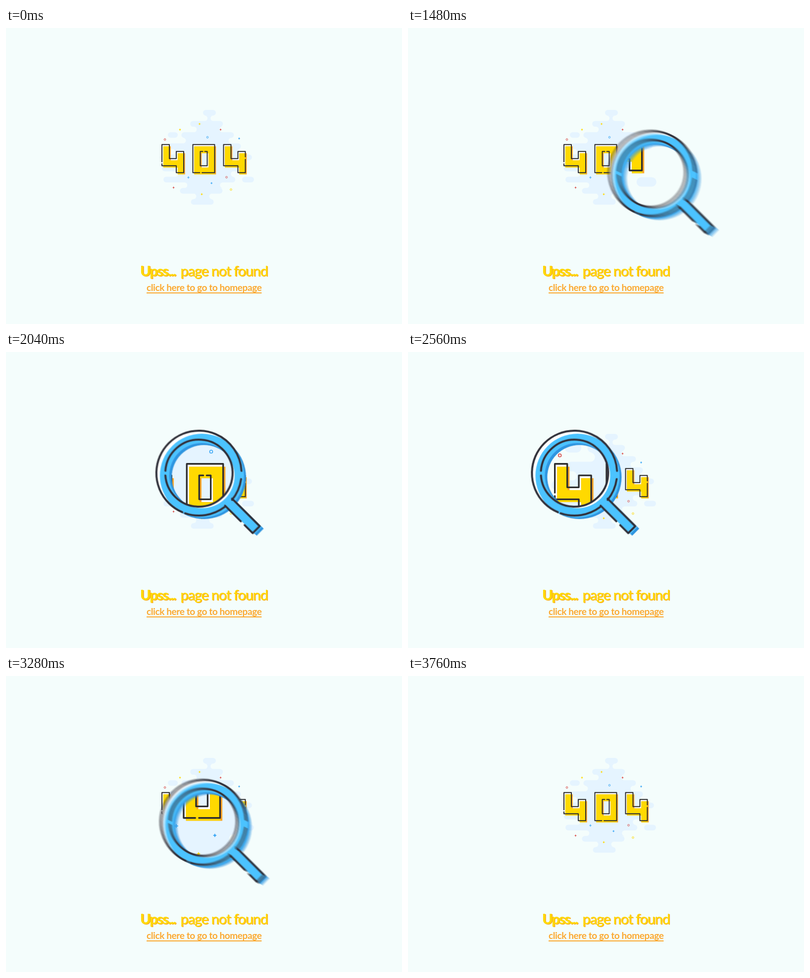
Recreate the animation shown at these times as an HTML page with a canvas. Size 800 px wide and 600 px high, loop 4.8 s.

```html
<!DOCTYPE html>
<html lang="en">
<head>
<meta charset="utf-8">
<title>404</title>
<style>
html, body { margin: 0; width: 100%; height: 100%; overflow: hidden; background: #f4fdfc; }
.stage { position: absolute; left: 0; top: 0; width: 800px; height: 600px; overflow: hidden; }
canvas { position: absolute; left: 0; top: 0; }
span { position: absolute; white-space: nowrap; font-family: Lato, sans-serif; line-height: 1; }
.title { top: 476.5px; font-size: 29px; color: #ffd900; text-shadow: 1.4px 1.2px 0 #f8a92b; }
.upss { left: 271px; font-weight: 800; letter-spacing: -1.8px; }
.rest { right: 271.5px; font-weight: 500; letter-spacing: -1.25px; }
.link { left: 284px; top: 516px; font-size: 19px; font-weight: 700; letter-spacing: -.4px;
  color: #fba931; text-decoration: underline 1.5px; text-underline-offset: 2.5px; }
</style>
</head>
<body>
<div class="stage">
  <canvas id="view" width="800" height="600"></canvas>
  <span class="title upss">Upss...</span>
  <span class="title rest">page not found</span>
  <span class="link">click here to go to homepage</span>
</div>
<script>
const LOOP = 4800, STEP = 40, ENTER = 1040, LEAVE = 3760;
const ZOOM = 1.67, SHUTTER = 20, SAMPLES = 15, ORIGIN = 110;
const BG = '#f4fdfc', CLOUD = '#e5f4ff', INK = '#2d2d2f', YELLOW = '#ffd900', ORANGE = '#f9a62b';
const BLUE = '#4ab8f8', DEEP = '#2d8fd8', RED = '#d9534f', SKY = '#3fa9f5';
const TAU = 2 * Math.PI;

const sparks = [
  ['star', 391, 194.5, YELLOW], ['star', 351.5, 206, YELLOW], ['star', 433.5, 206, RED],
  ['ring', 407, 221.5, SKY], ['star', 471, 224, SKY], ['ring', 321, 226, RED],
  ['plus', 368.5, 303, SKY], ['star', 415.2, 314.5, SKY], ['ring', 445.5, 302.5, RED],
  ['star', 338.5, 323.5, RED], ['ring', 454.5, 327.5, YELLOW], ['star', 395.5, 337, YELLOW]
];

const W = 44, H = 57, STEM = 15, BAR = 14;
const rect = (x, y, w, h) => [[x, y], [x + w, y], [x + w, y + h], [x, y + h]];
const four = [
  [0, 0], [STEM, 0], [STEM, H / 2], [W - STEM, H / 2], [W - STEM, BAR],
  [W, BAR], [W, H], [W - STEM, H], [W - STEM, H - BAR], [0, H - BAR]
];
const digits = [
  { x: 315, fill: [four], lines: [[[0, 35], ...four, [0, 39]]] },
  {
    x: 377.5, fill: [rect(0, 0, W, H), rect(STEM, BAR, W - 2 * STEM, H - 2 * BAR)],
    lines: [
      [[14, H], [0, H], [0, 0], [W, 0], [W, H], [18.5, H]],
      [[20, BAR], [STEM, BAR], [STEM, H - BAR], [W - STEM, H - BAR], [W - STEM, BAR], [24, BAR]]
    ]
  },
  { x: 439.5, fill: [four], lines: [[[W, 30], ...four.slice(6), ...four.slice(0, 6), [W, 25]]] }
];

const makeCanvas = (w, h) =>
  Object.assign(document.createElement('canvas'), { width: w, height: h }).getContext('2d');
const view = document.getElementById('view').getContext('2d');
const lens = makeCanvas(2 * ORIGIN + 40, 2 * ORIGIN + 40), blur = makeCanvas(800, 600);

const part = (t, from, to) => Math.min(1, Math.max(0, (t - from) / (to - from)));
const smooth = u => u * u * (3 - 2 * u);

function line(c, pts) {
  pts.forEach(([x, y], i) => i ? c.lineTo(x, y) : c.moveTo(x, y));
}

function strokeLine(c, pts) {
  c.beginPath();
  line(c, pts);
  c.stroke();
}

function shape(polys, dx, dy) {
  const p = new Path2D();
  for (const pts of polys) {
    line(p, pts.map(([x, y]) => [x + dx, y + dy]));
    p.closePath();
  }
  return p;
}

function fill(c, path, color) {
  c.fillStyle = color;
  c.fill(path, 'evenodd');
}

function pen(c, width) {
  c.strokeStyle = INK;
  c.lineWidth = width;
  c.lineCap = c.lineJoin = 'round';
}

// round ends bulge out on pills and cut in on necks
function cloudRow(c, x0, x1, y, h, isNeck) {
  const r = h / 2, d = isNeck ? -r : r;
  c.beginPath();
  c.arc(x1 - d, y + r, r, -TAU / 4, TAU / 4, isNeck);
  c.arc(x0 + d, y + r, r, TAU / 4, -TAU / 4, isNeck);
  c.fill();
}

function drawCloud(c) {
  const h = 11.3, top = 166;
  c.fillStyle = CLOUD;
  for (let i = 0; i < 17; i++) {
    const neck = i % 2 === 1;
    const half = 98 - 10 * Math.abs(i - 8.5) - (neck ? 20 : 0);
    const mid = 411 - .9 * i - (i % 4 === 2 ? 4 : 0);
    cloudRow(c, mid - half, mid + half, top + i * h, h + .2, neck);
  }
  cloudRow(c, 327, 347, top + 4 * h, h);
  cloudRow(c, 318, 350, top + 12 * h, h);
  cloudRow(c, 477, 501, top + 12 * h, h);
}

function drawSpark(c, [kind, x, y, color]) {
  c.fillStyle = c.strokeStyle = color;
  c.lineWidth = 1;
  c.beginPath();
  if (kind === 'ring') {
    c.arc(x, y, 1.8, 0, TAU);
    c.stroke();
  } else if (kind === 'plus') {
    c.rect(x - 2.3, y - .6, 4.6, 1.2);
    c.rect(x - .6, y - 2.3, 1.2, 4.6);
    c.fill();
  } else {
    for (let i = 0; i < 8; i++) {
      const a = i * TAU / 8, d = i % 2 ? 1.2 : 2.4;
      c.lineTo(x + d * Math.cos(a), y + d * Math.sin(a));
    }
    c.fill();
  }
}

function drawDigit(c, d) {
  const face = shape(d.fill, 2.8, 3.4);
  c.save();
  c.translate(d.x, 236.3);
  fill(c, shape(d.fill, 0, 0), '#fff');
  fill(c, face, ORANGE);
  c.save();
  c.clip(shape(d.fill, .3, 3.4), 'evenodd');
  fill(c, face, YELLOW);
  c.restore();
  pen(c, 2);
  d.lines.forEach(l => strokeLine(c, l));
  c.restore();
}

function drawScene(c) {
  c.fillStyle = BG;
  c.fillRect(0, 0, 800, 600);
  drawCloud(c);
  sparks.forEach(s => drawSpark(c, s));
  digits.forEach(d => drawDigit(c, d));
}

function annulus(x, y, outer, inner) {
  const p = new Path2D();
  p.arc(x, y, outer, 0, TAU);
  p.closePath();
  p.moveTo(x + inner, y);
  p.arc(x, y, inner, 0, TAU);
  return p;
}

function arcLine(c, radius, from, to) {
  c.beginPath();
  c.arc(-6, -5, radius, from * TAU / 360, to * TAU / 360);
  c.stroke();
}

function buildLens(c) {
  // along and across the handle, which points down right
  const grip = (a, b) => [(a - b) * Math.SQRT1_2, (a + b) * Math.SQRT1_2];
  const near = 76, far = 155, half = 10;
  const handle = [grip(near, half), grip(far, half), grip(far, -half), grip(near, -half)];
  c.translate(ORIGIN, ORIGIN);
  fill(c, annulus(-6, -5, 86, 68), '#fff');
  fill(c, shape([handle], 8, 5), DEEP);
  fill(c, annulus(4, 3, 85, 65), DEEP);
  fill(c, shape([handle], 4, 2), BLUE);
  fill(c, annulus(0, 0, 85, 66), BLUE);
  pen(c, 4);
  arcLine(c, 86, 113, 357);
  arcLine(c, 86, 8, 39);
  arcLine(c, 86, 53, 109);
  arcLine(c, 68, 184, 536);
  strokeLine(c, [handle[0], grip(121, half)]);
  strokeLine(c, [grip(132, half), ...handle.slice(1)]);
}

// swoop in, drift left along a shallow arc, swoop out
function place(t) {
  const enter = part(t, 1760, 1000), drift = part(t, 1760, 2680), leave = part(t, 2680, LEAVE);
  const arc = Math.min(1, Math.abs(t - 2300) / 380);
  return [
    412 - 73 * smooth(drift) + 504 * enter ** 1.75 + 600 * leave ** 3.75,
    244 + 14 * arc ** 2 + 254 * enter ** 1.8 + 240 * leave ** 2.9
  ];
}

function drawGlass(c, x, y) {
  c.save();
  c.beginPath();
  c.arc(x, y, 69, 0, TAU);
  c.clip();
  c.translate(x, y);
  c.scale(ZOOM, ZOOM);
  c.translate(-x, -y);
  drawScene(c);
  c.restore();
}

// average of the lens over the open shutter
function drawLens(c, t) {
  blur.clearRect(0, 0, 800, 600);
  blur.globalCompositeOperation = 'lighter';
  blur.globalAlpha = 1 / SAMPLES;
  for (let i = 0; i < SAMPLES; i++) {
    const [x, y] = place(t + SHUTTER * ((i + .5) / SAMPLES - .5));
    blur.drawImage(lens.canvas, x - ORIGIN, y - ORIGIN);
  }
  c.drawImage(blur.canvas, 0, 0);
}

function draw(ms) {
  const t = Math.floor((ms % LOOP) / STEP) * STEP;
  drawScene(view);
  if (t < ENTER || t >= LEAVE) return;
  drawGlass(view, ...place(t));
  drawLens(view, t);
}

buildLens(lens);
const start = performance.now();
function tick() {
  draw(performance.now() - start);
  requestAnimationFrame(tick);
}
tick();
</script>
</body>
</html>
```
